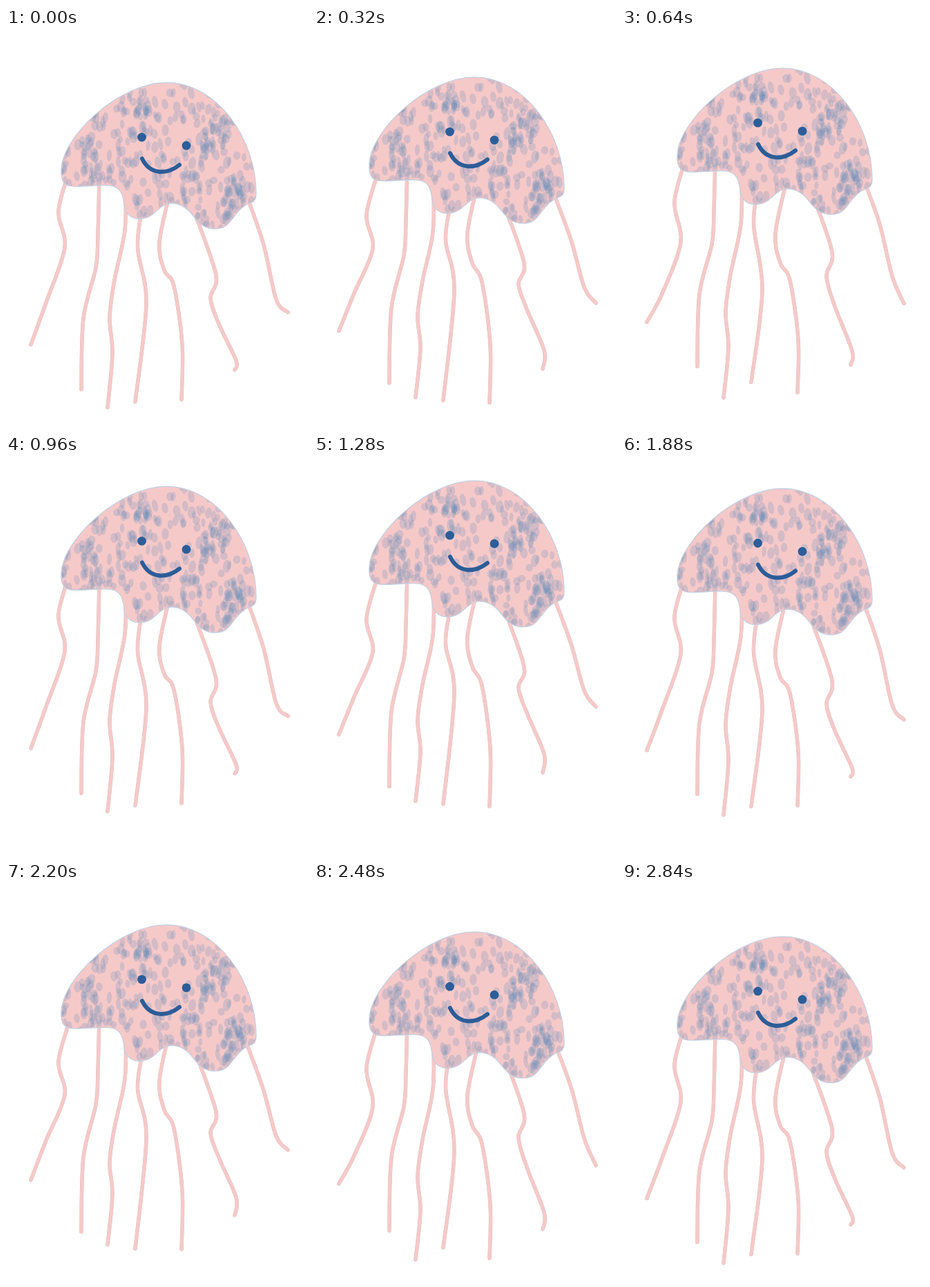
Recreate the animation shown at these times as an HTML page with a canvas. Size 437 px wide and 577 px high, loop 2.88 s.

```html
<!DOCTYPE html>
<html lang="en">
<head>
<meta charset="utf-8">
<title>Jellyfish</title>
<style>
  html, body { margin: 0; width: 100%; height: 100%; overflow: hidden; background: #fff; }
  canvas { display: block; width: 437px; height: 577px; }
</style>
</head>
<body>
<canvas id="stage"></canvas>
<script>
const W = 437, H = 577, LOOP = 2880, STEP = 40, SWAY = 960;
const RISE = 43, REACH = 7.8;
const PINK = '#f6c9c9', BLUE = '#2c5d98';
const canvas = document.getElementById('stage');
const ctx = canvas.getContext('2d');
const dpr = window.devicePixelRatio || 1;
canvas.width = W * dpr;
canvas.height = H * dpr;

const bell = new Path2D(
  'M80 205 C82 155 165 79 232 79 C305 79 362 160 362 240' +
  'C362 249 358 252 353 253 C340 258 334 268 325 279' +
  'C318 289 310 290.5 302 290.5 C288 290 281 284 272 273' +
  'C262 259 252 253.5 240 253.5 C226 253.5 218 266 210 271' +
  'C204 275 198 276 192 276 C180 275 172 268 171 256' +
  'C169 238 165 228 146 227.5 C130 227 115 229.5 100 229 C86 229 79 224 80 205Z');
const smile = new Path2D('M197 189 C208 212 232 213 251 198');

// Phase in degrees at the root and at the tip, then the resting points
const tentacles = [
  [140, 360, [95, 203], [76, 271], [85, 325], [58, 398], [36, 450]],
  [0, 54, [135, 210], [133, 290], [130, 339], [112, 413], [109, 518]],
  [180, 270, [173, 230], [172, 300], [157, 372], [150, 425], [154, 475], [147, 549]],
  [90, -274, [198, 254], [190.5, 312], [203, 395], [187, 540]],
  [-95, -188, [238, 235], [222, 311], [229, 353], [243, 378], [255, 465], [254, 545]],
  [20, -150, [276, 268], [304, 350], [296, 383], [308, 422], [333, 481], [331, 501]],
  [100, -97, [344, 232], [372, 309], [391, 385], [408, 412]]
];

let seed = 7;
function rand() {
  seed = (seed * 16807) % 2147483647;
  return seed / 2147483647;
}
const range = (lo, hi) => lo + rand() * (hi - lo);
const around = (mid, r) => mid + (rand() + rand() + rand() - 1.5) * r;

const spots = [];
function addSpot(x, y) {
  spots.push({ x, y, rx: range(3, 5.8), ry: range(5, 9.5), tilt: range(-0.2, 0.2) });
}
for (let i = 0; i < 330; i++) addSpot(range(76, 366), range(76, 294));
// Denser patches
for (const [x, y] of [[308, 132], [120, 195], [125, 132], [292, 165], [325, 240], [200, 130]]) {
  for (let i = 0; i < 18; i++) addSpot(around(x, 17), around(y, 34));
}

const bez = (s, a, b) => 3 * (1 - s) ** 2 * s * a + 3 * (1 - s) * s * s * b + s ** 3;

function ease(u) {
  let lo = 0, hi = 1;
  for (let i = 0; i < 24; i++) {
    const mid = (lo + hi) / 2;
    if (bez(mid, 0.3, 0.65) < u) lo = mid; else hi = mid;
  }
  return bez(lo, 0.1, 1);
}

function lift(t) {
  const u = t / (LOOP / 2);
  return -RISE * (u < 1 ? ease(u) : 1 - ease(u - 1));
}

// Smooth curve through all points
function curve(pts) {
  const path = new Path2D();
  const at = i => pts[Math.max(0, Math.min(pts.length - 1, i))];
  path.moveTo(...pts[0]);
  for (let i = 0; i < pts.length - 1; i++) {
    const [p, a, b, n] = [at(i - 1), at(i), at(i + 1), at(i + 2)];
    path.bezierCurveTo(
      a[0] + (b[0] - p[0]) / 6, a[1] + (b[1] - p[1]) / 6,
      b[0] - (n[0] - a[0]) / 6, b[1] - (n[1] - a[1]) / 6, b[0], b[1]);
  }
  return path;
}

function line(path, color, width) {
  ctx.strokeStyle = color;
  ctx.lineWidth = width;
  ctx.stroke(path);
}

function dot(x, y, r) {
  ctx.beginPath();
  ctx.arc(x, y, r, 0, 2 * Math.PI);
  ctx.fill();
}

function drawTentacles(t) {
  for (const [root, tip, ...pts] of tentacles) {
    const path = curve(pts.map(([x, y], i) => {
      const k = i / (pts.length - 1);
      const phase = root + (tip - root) * k * k;
      return [x, y + REACH * Math.cos(2 * Math.PI * (t / SWAY - phase / 360))];
    }));
    line(path, '#cdb9b9', 5.4);
    line(path, PINK, 5);
  }
}

function drawBell() {
  ctx.fillStyle = PINK;
  ctx.fill(bell);
  ctx.save();
  ctx.clip(bell);
  ctx.fillStyle = 'rgba(100,138,182,0.23)';
  for (const s of spots) {
    ctx.beginPath();
    ctx.ellipse(s.x, s.y, s.rx, s.ry, s.tilt, 0, 2 * Math.PI);
    ctx.fill();
  }
  ctx.restore();
  line(bell, '#c4cfe0', 1.3);
}

function drawFace() {
  ctx.fillStyle = BLUE;
  dot(196.5, 158, 6.4);
  dot(261, 170, 6.4);
  line(smile, BLUE, 6);
}

const start = performance.now();
function frame() {
  const t = Math.floor(((performance.now() - start) % LOOP) / STEP) * STEP;
  ctx.setTransform(dpr, 0, 0, dpr, 0, 0);
  ctx.fillStyle = '#fff';
  ctx.fillRect(0, 0, W, H);
  ctx.lineCap = ctx.lineJoin = 'round';
  ctx.translate(0, lift(t));
  drawTentacles(t);
  drawBell();
  drawFace();
  requestAnimationFrame(frame);
}
frame();
</script>
</body>
</html>
```
